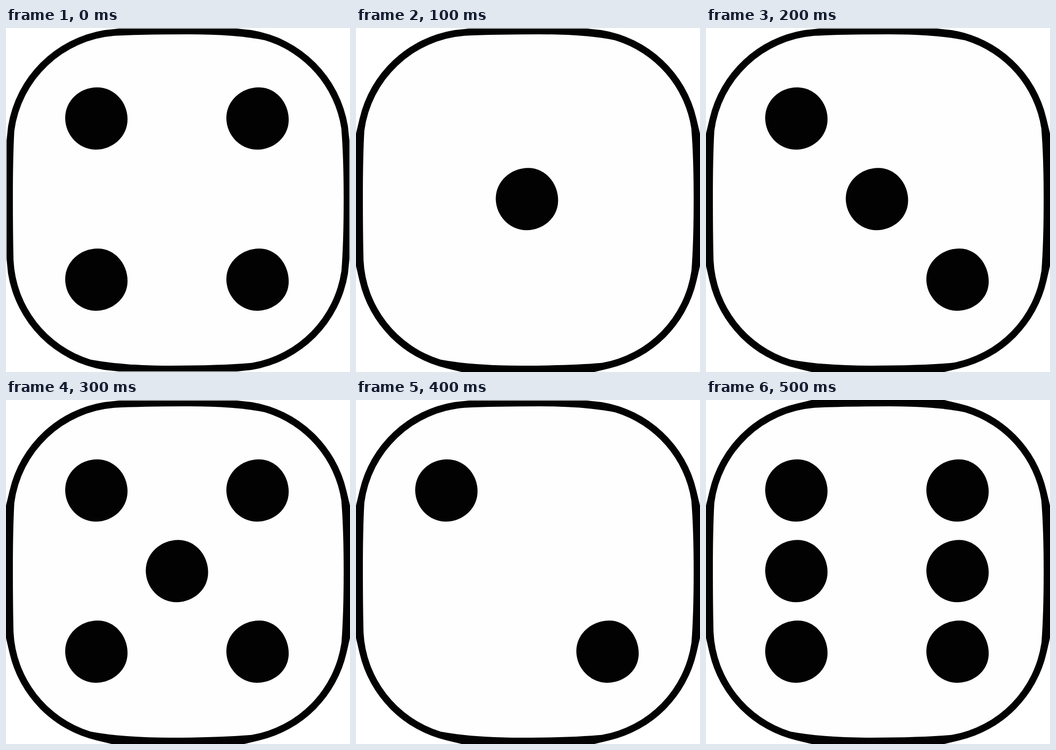
These frames come from a looping animation (651 by 652 pixels, 600 ms). An HTML page:

```html
<!DOCTYPE html>
<html lang="en">
<head>
<meta charset="utf-8">
<title>Rolling die</title>
<style>
html, body { margin: 0; width: 100%; height: 100%; overflow: hidden; background: #fff; }
#strip { display: flex; width: 3906px; height: 652px; animation: roll 600ms steps(6) infinite; }
#strip svg { flex: none; width: 651px; height: 652px; fill: #020202; }
#strip .face { fill: #fefefe; }
@keyframes roll { to { transform: translateX(-3906px); } }
</style>
</head>
<body>
<div id="strip"></div>
<script>
const W = 651, H = 652;
const NEAR = 222;                        // corner circles sit this far from each side
const FAR = [W - NEAR, H - NEAR];
const RIM = 221, FACE = 208;             // outer and inner corner radii

// Point on a corner circle at position t along a side (0 top, 1 right, 2 bottom, 3 left).
function onCorner(side, t, r) {
  const axis = side % 2;
  const off = t < NEAR ? NEAR - t : Math.max(0, t - FAR[axis]);
  const h = Math.sqrt(r * r - off * off);
  const depth = side === 1 || side === 2 ? FAR[1 - axis] + h : NEAR - h;
  return axis ? [depth, t] : [t, depth];
}

// Clockwise outline: corner arcs joined by edges of the form [start, depth, end].
function outline(edges, r, slack, join) {
  const parts = edges.map(([lo, depth, hi], side) => {
    const stops = side > 1 ? [hi, lo] : [lo, hi];
    const [from, to] = stops.map(t =>
      onCorner(side, t === lo ? t - slack : t + slack, r));
    const at = t => side % 2 ? [depth, t] : [t, depth];
    return { from, path: join(at, stops, to) };
  });
  return 'M' + parts.map((p, i) =>
    `${p.from}${p.path}A${r} ${r} 0 0 1 ${i < 3 ? '' : parts[0].from}`).join('') + 'Z';
}

const straight = (at, [a, b], end) => `L${at(a)}L${at(b)}L${end}`;
const bowed = (at, [a, b], end) => {
  const reach = (b - a) * 0.2;
  return `Q${at(a + reach)} ${at((a + b) / 2)}Q${at(b - reach)} ${end}`;
};

// Rounded sides stay just inside the stage, the others are cut flat by it.
function rim(rounded) {
  const edges = [0, 1, 2, 3].map(side => {
    const inset = side < rounded ? 1 : 0;
    const depth = [inset, W - inset, H - inset, inset][side];
    return inset ? [214, depth, 437] : [200, depth, 451];
  });
  return outline(edges, RIM, 28, straight);
}

const face = outline(
  [[205, 12, 490], [190, 639, 460], [160, 640, 465], [195, 13, 440]], FACE, 0, bowed);

// Slightly lopsided dot; s turns its top and right extremes clockwise.
function pip([col, row]) {
  const x = 171 + 152.5 * col, y = 171.5 + 152.7 * row;
  const s = (3 + col + row) / 2;
  return `<path transform="translate(${x} ${y})" d="M${s} -59` +
    `C${s + 32} -59 59 ${s - 33} 59 ${s}S${31 - s / 4} 59 -1 59` +
    `S-59 32 -59 -1S${s - 33} -59 ${s} -59Z"/>`;
}

// Cells of the 3 by 3 grid that show a value.
function cells(value) {
  return [
    ...(value % 2 ? [[1, 1]] : []),
    ...(value > 1 ? [[0, 0], [2, 2]] : []),
    ...(value > 3 ? [[2, 0], [0, 2]] : []),
    ...(value > 5 ? [[0, 1], [2, 1]] : [])
  ];
}

// The first face is rounded all the way, the last is cut on every side.
const rolls = [4, 1, 3, 5, 2, 6];
const roundedSides = i => i === 0 ? 4 : i === rolls.length - 1 ? 0 : 1;

document.getElementById('strip').innerHTML = rolls.map((value, i) =>
  `<svg viewBox="0 0 ${W} ${H}">
    <path d="${rim(roundedSides(i))}"/>
    <path class="face" d="${face}"/>
    ${cells(value).map(pip).join('')}
  </svg>`).join('');
</script>
</body>
</html>
```
